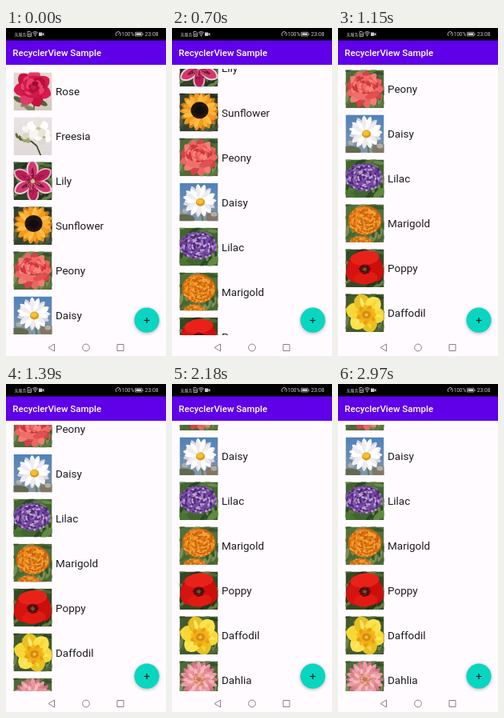
These frames come from a looping animation (200 px wide and 410 px high, 3 s). An HTML page with a canvas:

```html
<!DOCTYPE html>
<html lang="en">
<head>
<meta charset="utf-8">
<title>RecyclerView Sample</title>
<style>
html, body { margin: 0; width: 100%; height: 100%; overflow: hidden; background: #fffbff; }
canvas { display: block; width: 200px; height: 410px; }
</style>
</head>
<body>
<canvas id="stage"></canvas>
<script>
const canvas = document.getElementById('stage');
const c = canvas.getContext('2d');
const ratio = window.devicePixelRatio || 1;
canvas.width = 200 * ratio;
canvas.height = 410 * ratio;

const LOOP = 3000, PITCH = 56, PHOTO_W = 48, PHOTO_H = 47.5;
const GOLDEN = 2.39996;

const noise = i => Math.abs(Math.sin(i * 12.9898) * 43758.5) % 1;

function rect(x, y, w, h, fill) {
  c.fillStyle = fill;
  c.fillRect(x, y, w, h);
}
function oval(x, y, rx, ry, fill, turn = 0) {
  c.beginPath();
  c.ellipse(x, y, rx, ry, turn, 0, Math.PI * 2);
  c.fillStyle = fill;
  c.fill();
}
function line(points, color, width, close = false) {
  c.beginPath();
  points.forEach(([x, y]) => c.lineTo(x, y));
  if (close) c.closePath();
  c.strokeStyle = color;
  c.lineWidth = width;
  c.stroke();
}
function ring(x, y, r, color, width, from = 0, to = Math.PI * 2) {
  c.beginPath();
  c.arc(x, y, r, from, to);
  c.strokeStyle = color;
  c.lineWidth = width;
  c.stroke();
}
function text(str, x, y, size, color, weight = 400) {
  c.font = `${weight} ${size}px Roboto, "Noto Sans CJK SC", sans-serif`;
  c.fillStyle = color;
  c.fillText(str, x, y);
}

// A wheel of pointed petals, alternating through the given colours
function petals(x, y, n, length, width, colors, turn = 0) {
  for (let i = 0; i < n; i++) {
    c.save();
    c.translate(x, y);
    c.rotate(turn + i * Math.PI * 2 / n);
    c.beginPath();
    c.moveTo(0, 0);
    c.bezierCurveTo(length * .35, -width, length * .85, -width, length, 0);
    c.bezierCurveTo(length * .85, width, length * .35, width, 0, 0);
    c.fillStyle = colors[i % colors.length];
    c.fill();
    c.restore();
  }
}
// Sunflower-seed packing, drawn from the rim inward in mixed colours
function florets(x, y, rx, ry, n, size, colors) {
  for (let i = n; i >= 0; i--) {
    const r = Math.sqrt(i / n), a = i * GOLDEN;
    oval(x + rx * r * Math.cos(a), y + ry * r * Math.sin(a), size, size * .7,
      colors[Math.floor(noise(i + 1) * colors.length)], a + 1.57);
  }
}
function leaves(base, colors) {
  rect(0, 0, PHOTO_W, PHOTO_H, base);
  for (let i = 0; i < 30; i++)
    oval(i * 29.7 % 48, i * 17.3 % 48, 7, 2.2, colors[i % colors.length], i * 1.1);
}
function sky(top, bottom) {
  const g = c.createLinearGradient(0, 0, 0, PHOTO_H);
  g.addColorStop(0, top);
  g.addColorStop(1, bottom);
  rect(0, 0, PHOTO_W, PHOTO_H, g);
}

const flowers = {
  Rose() {
    sky('#e3d9d2', '#d2c7ba');
    line([[27, 28], [25, 48]], '#526d34', 1.8);
    [[6, 34, .5], [15, 39, -.5], [36, 38, .5], [20, 45, .4]]
      .forEach(([x, y, a], i) => oval(x, y, 7, 3, i % 2 ? '#7d8960' : '#526440', a));
    petals(24, 20, 7, 24, 11, ['#d81a50', '#c5133f', '#e23a68'], .35);
    oval(25, 18, 17, 14, '#cb1745');
    florets(25, 17, 14, 11, 20, 4.5, ['#b80f3a', '#e83f6e', '#d01b4c']);
    oval(27, 14, 4, 3, '#9c0b30');
  },
  Freesia() {
    sky('#e9e3e3', '#dfd9d8');
    line([[4, 24], [13, 30], [22, 30], [29, 36], [34, 48]], '#3e4a25', 1.7);
    [[4, 23], [8, 26], [13, 28], [18, 29]].forEach(([x, y], i) =>
      oval(x, y, 1.6 + i * .3, 3.4, i < 2 ? '#5d6b34' : '#a3a76e', -.3));
    petals(19, 19, 4, 11, 5, ['#f7f5ef', '#d9d6c8'], -2.4);
    petals(37, 24, 5, 11, 6, ['#fcfbf8', '#dcd8ce'], .5);
    petals(30, 13, 5, 14, 8, ['#fff', '#e7e4db', '#f7f5f0'], -.3);
    oval(31, 14, 3, 2, '#cbc689');
    oval(38, 25, 2, 1.8, '#b9b57c');
  },
  Lily() {
    leaves('#2f4327', ['#4e6b38', '#1f321e', '#67804b']);
    petals(24, 24, 6, 27, 10, ['#f2cfda', '#e5abc1'], .5);
    petals(24, 24, 6, 25, 7.5, ['#d2386f', '#bb1d57'], .5);
    petals(24, 24, 6, 17, 2.5, ['#8b123f', '#a3174a'], .5);
    florets(24, 24, 11, 11, 22, .7, ['#6e0d31', '#ee9fb9']);
    oval(24, 24, 2.5, 2.5, '#c3c87b');
    for (let i = 0; i < 6; i++) {
      const x = 25 + 9 * Math.cos(i), y = 29 + 8 * Math.sin(i);
      line([[24, 24], [x, y]], '#d9c99c', .6);
      oval(x, y, 1.7, .9, '#64201c', i);
    }
  },
  Sunflower() {
    leaves('#38402f', ['#262e26', '#576142', '#434f36']);
    petals(25, 22, 18, 25, 5.5, ['#d07a12', '#e9951c']);
    petals(25, 22, 19, 22, 4.5, ['#fbb034', '#f29a1f', '#ffbe45'], .18);
    oval(25, 21, 11, 10.5, '#23140e');
    florets(25, 21, 10, 9.5, 50, .8, ['#3c2113', '#1a0f0b', '#120c0a']);
    oval(25, 21, 6, 5.5, '#120d0a');
  },
  Peony() {
    leaves('#4f6938', ['#36502a', '#7c8d55', '#5c783f']);
    oval(24, 22, 22, 17, '#d33f43');
    petals(24, 24, 13, 24, 7, ['#ee6461', '#d44347', '#f37d74']);
    florets(24, 20, 17, 12, 48, 3.6, ['#e65654', '#f8857d', '#cb383f', '#f26b66']);
    oval(18, 33, 10, 4, '#ee706b', .2);
    oval(33, 32, 9, 4, '#df5153', -.3);
  },
  Daisy() {
    sky('#4f82ba', '#8497a8');
    oval(5, 45, 14, 6, '#646a4d');
    oval(42, 43, 9, 8, '#857661');
    line([[26, 26], [29, 48]], '#617c3d', 2);
    [[7, 35], [43, 39]].forEach(([x, y]) => oval(x, y, 4, 3, '#a9afb0'));
    petals(25, 22, 15, 21, 4.5, ['#f5f3f5', '#d6d6df', '#fff']);
    petals(25, 22, 13, 19, 3.5, ['#fff', '#eeecf0'], .2);
    oval(26, 24, 5.5, 5, '#d99718');
    oval(25.5, 23, 4, 3.3, '#f3c132');
  },
  Lilac() {
    leaves('#426530', ['#68894a', '#294a26', '#55783d']);
    florets(23, 22, 23, 17, 190, 1.9,
      ['#8550b5', '#a67acf', '#5d3089', '#c3a3de', '#7543a6', '#4c2673']);
    oval(42, 42, 9, 4, '#608a40', -.7);
    oval(5, 44, 9, 4, '#48752f', .6);
  },
  Marigold() {
    leaves('#52713b', ['#38572b', '#7a8e54', '#48672f']);
    line([[24, 36], [25, 48]], '#7b8f43', 2);
    oval(24, 20, 21, 18, '#c9660f');
    florets(24, 20, 20, 17, 190, 1.8, ['#ee8f22', '#da7412', '#f6a539', '#c9620e']);
    florets(19, 48, 14, 8, 70, 1.8, ['#ea851b', '#d06a10', '#f39f37']);
  },
  Poppy() {
    leaves('#334a24', ['#4d6733', '#213619', '#627a40']);
    oval(24, 22, 22, 18, '#c40c0b');
    oval(14, 27, 13, 15, '#d6130f', .4);
    oval(35, 25, 12, 16, '#cc0e0d', -.3);
    oval(24, 11, 18, 9, '#e92219', -.1);
    oval(25, 36, 15, 8, '#e01b14', -.1);
    oval(24, 25, 7, 6, '#6d0b0b');
    florets(24, 25, 7, 6, 40, .8, ['#180e10', '#340d0d', '#8a1512']);
    oval(24, 25, 2.5, 2.3, '#5b5f3d');
  },
  Daffodil() {
    leaves('#435a2d', ['#2c4420', '#6c8048', '#4d6835']);
    petals(25, 24, 6, 25, 13, ['#f6d836', '#e8c023', '#fbe24d'], .2);
    petals(25, 24, 6, 21, 3, ['#ffe866', '#f7d535'], .2);
    petals(26, 26, 11, 13, 4.5, ['#f6b91a', '#e79d10']);
    oval(26, 26, 8.5, 8, '#f0ad16');
    oval(26, 26, 5.5, 5, '#d58c10');
    oval(26, 26, 2, 2, '#f3c547');
  },
  Dahlia() {
    leaves('#4d6936', ['#36522b', '#769052', '#5d7b42']);
    petals(24, 23, 20, 24, 4.5, ['#d27282', '#ea9ca8']);
    petals(24, 23, 19, 20, 4, ['#f3b2b8', '#dc8090', '#e899a4'], .15);
    petals(24, 23, 17, 15, 3.2, ['#e58f98', '#f6bcbc'], .3);
    florets(24, 23, 8, 8, 45, 1.5, ['#e9a180', '#d47f72', '#eeb09a']);
    oval(24, 23, 2.5, 2.5, '#c07a50');
  }
};

// Scroll keys: time, offset, velocity
const keys = [
  [250, 0, 0], [480, 48.5, .43], [600, 104, .44], [910, 191, .19],
  [1390, 247.6, .063], [1850, 265, .02], [2180, 269, 0]
];
function scrollAt(t) {
  if (t <= keys[0][0]) return 0;
  const i = keys.findIndex(k => k[0] >= t);
  if (i < 0) return keys[keys.length - 1][1];
  const [t0, s0, v0] = keys[i - 1], [t1, s1, v1] = keys[i];
  const d = t1 - t0, u = (t - t0) / d, w = 1 - u;
  return w * w * ((1 + 2 * u) * s0 + u * d * v0) + u * u * ((3 - 2 * u) * s1 - w * d * v1);
}

function drawList(offset) {
  c.save();
  c.beginPath();
  c.rect(0, 51, 200, 333);
  c.clip();
  Object.entries(flowers).forEach(([name, paint], i) => {
    const y = 55.5 + PITCH * i - offset;
    if (y < 0 || y > 384) return;
    c.save();
    c.translate(9.5, y);
    c.beginPath();
    c.rect(0, 0, PHOTO_W, PHOTO_H);
    c.clip();
    paint();
    c.restore();
    text(name, 62, y + 28.7, 13.5, '#1d1b1e');
  });
  c.restore();
}

function drawStatus() {
  const ink = '#c8c8c8';
  rect(0, 0, 200, 15.5, '#000');
  text('无服务', 10.5, 9.8, 5, ink);
  c.lineJoin = 'round';
  line([[27, 4.5], [30, 4.5], [31.5, 6], [31.5, 10.5], [27, 10.5]], ink, .8, true);
  line([[28.3, 7], [30.2, 7], [30.2, 9], [28.3, 9]], ink, .6, true);
  [1.8, 3.6, 5.2].forEach(r => ring(36.5, 10, r, ink, .9, -2.3, -.84));
  oval(36.5, 9.8, .7, .7, ink);
  rect(41, 5.5, 4.3, 4.5, ink);
  c.beginPath();
  c.moveTo(45, 7.7);
  c.lineTo(47.5, 5.7);
  c.lineTo(47.5, 9.8);
  c.fill();
  ring(140.3, 7.7, 3.1, ink, .9, 2.3, 7.1);
  line([[140, 8.3], [142, 6.2]], ink, .9);
  text('100%', 144.5, 10.1, 6.5, ink);
  line([[161.5, 5.3], [170, 5.3], [170, 10], [161.5, 10]], ink, .7, true);
  rect(162.5, 6.3, 6.5, 2.7, ink);
  rect(170.5, 6.8, 1, 1.8, ink);
  text('23:08', 173.8, 10.4, 6.7, ink);
}

function drawBars() {
  rect(0, 15, 200, 31, '#5f00e8');
  drawStatus();
  text('RecyclerView Sample', 8.3, 34.5, 11.5, '#fff', 500);
  const gray = '#858187';
  line([[60.5, 395], [60.5, 404], [53, 399.5]], gray, 1, true);
  ring(100, 399.5, 4.4, gray, 1);
  line([[139, 395.5], [147, 395.5], [147, 403.5], [139, 403.5]], gray, 1, true);
}

function drawButton() {
  c.save();
  c.shadowColor = 'rgba(0,0,0,.3)';
  c.shadowBlur = 4 * ratio;
  c.shadowOffsetY = ratio;
  oval(176, 365.2, 15.6, 15.6, '#09d6c1');
  c.restore();
  line([[172.5, 365.5], [179.5, 365.5]], '#102522', 1.2);
  line([[176, 362], [176, 369]], '#102522', 1.2);
}

function draw(now) {
  const t = now % LOOP, offset = scrollAt(t);
  c.setTransform(ratio, 0, 0, ratio, 0, 0);
  rect(0, 0, 200, 410, '#fffbff');
  drawList(offset);
  drawBars();
  drawButton();
  if (t > 200 && t < 530) {
    oval(115.7, 266.5 - offset, 6.3, 6.3, 'rgba(255,255,255,.7)');
    ring(115.7, 266.5 - offset, 6.3, '#d8d4d9', 1);
  }
}

const start = performance.now();
function tick() {
  draw(performance.now() - start);
  requestAnimationFrame(tick);
}
tick();
</script>
</body>
</html>
```
